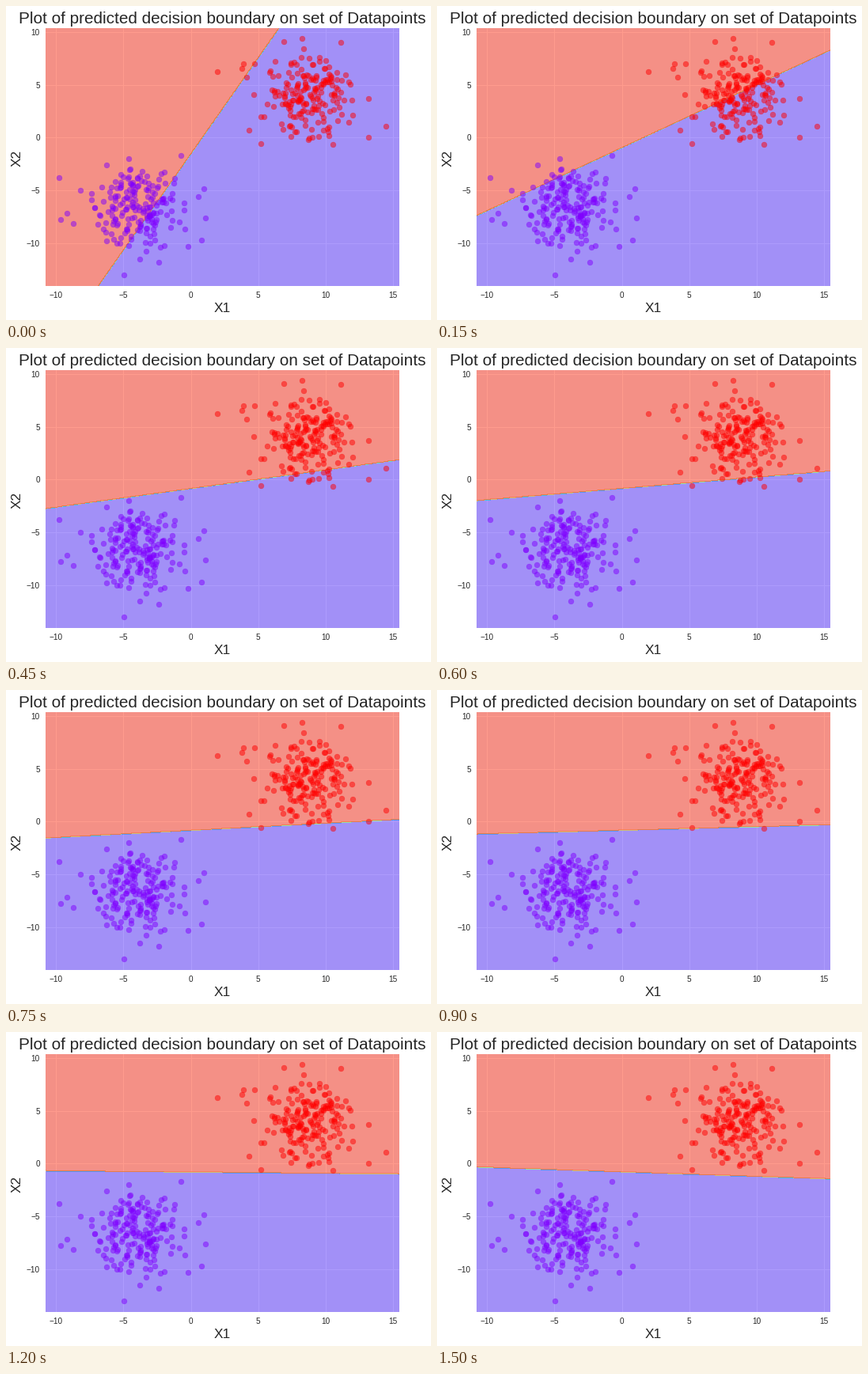
A matplotlib script for the animation above (1650 ms loop, 537 by 397 pixels).

```python
import matplotlib.pyplot as plt
import numpy as np
from matplotlib.animation import FuncAnimation

WIDTH, HEIGHT = 537, 397
LEFT, TOP, AX_W, AX_H = 50, 28, 447, 326.2
XLIM, YLIM = (-10.77, 15.463), (-14.025, 10.345)
MESH = 0.05
STEPS = 11
INK = "0.15"

# The few far-off points that give each cluster its outline.
RED_OUTLIERS = [
    (1.97, 6.2), (3.9, 7.0), (3.8, 6.5), (4.7, 7.0), (4.15, 5.7), (6.9, 9.05),
    (8.25, 9.4), (11.1, 9.0), (8.35, 8.4), (6.25, 7.2), (4.3, 0.7),
    (5.2, -0.55), (10.55, -0.65), (13.15, 0), (14.45, 1.05), (13.2, 3.7),
]
VIOLET_OUTLIERS = [
    (-9.75, -3.8), (-9.65, -7.75), (-9.2, -7.1), (-8.7, -8.1), (-8.2, -5.0),
    (-4.95, -13.0), (-2.35, -11.8), (-3.8, -11.5), (-0.75, -1.65),
    (-4.6, -1.95), (-6.25, -2.6), (0.95, -4.8), (1.1, -7.55), (0.55, -5.6),
    (0.8, -9.65), (-0.2, -10.25),
]

rng = np.random.default_rng(12)


def cluster(center, outliers, spread=2.05, reach=1.95, total=200):
    """Outliers plus a normal cloud cut off at `reach` deviations."""
    cloud = rng.normal(size=(total * 2, 2))
    cloud = cloud[np.hypot(*cloud.T) < reach][:total - len(outliers)]
    return np.vstack([outliers, center + spread * cloud])


def boundary(step):
    """Slope and offset of the decision line after a training step."""
    key_steps = np.array([0, 1, 2, 4, 6, 8, 10])
    key_slopes = [1.817, 0.596, 0.265, 0.107, 0.0336, -0.0115, -0.0427]
    slope = np.interp(np.log1p(step), np.log1p(key_steps), key_slopes)
    offset = -0.87 + 0.009 * step - 0.67 * np.exp(-2 * step)
    return slope, offset


plt.rcParams.update({"font.family": "Liberation Sans", "font.size": 12})
fig = plt.figure(figsize=(WIDTH / 72, HEIGHT / 72), dpi=72, facecolor="white")
ax = fig.add_axes([LEFT / WIDTH, 1 - (TOP + AX_H) / HEIGHT,
                   AX_W / WIDTH, AX_H / HEIGHT], facecolor="#eaeaf2")
ax.set(xlim=XLIM, ylim=YLIM, xticks=range(-10, 16, 5), yticks=range(-10, 11, 5))
ax.set_axisbelow(True)
ax.grid(color="white", linewidth=1)
ax.spines[:].set_visible(False)
ax.tick_params(length=0, pad=7, labelsize=10, labelcolor=INK)
ax.set_title("Plot of predicted decision boundary on set of Datapoints",
             fontsize="xx-large", color=INK, pad=6)


def axis_label(text, x, y, rotation=0):
    fig.text(x / WIDTH, 1 - y / HEIGHT, text, fontsize="x-large", color=INK,
             rotation=rotation, rotation_mode="anchor",
             ha="center", va="baseline")


axis_label("X1", LEFT + AX_W / 2, 387)
axis_label("X2", 19, TOP + AX_H / 2 + 1, rotation=90)

for points, color in [
    (cluster((8.6, 3.8), RED_OUTLIERS), (1, 0, 0)),
    (cluster((-3.8, -6.8), VIOLET_OUTLIERS), (0.5, 0, 1)),
]:
    ax.scatter(*points.T, s=49, color=color, alpha=0.5, linewidth=0.3,
               zorder=1.5)

mesh_x, mesh_y = np.meshgrid(np.arange(XLIM[0], XLIM[1] + MESH, MESH),
                             np.arange(YLIM[0], YLIM[1] + MESH, MESH))
levels = np.arange(8) * 0.15
regions = None


def update(step):
    global regions
    if regions is not None:
        regions.remove()
    slope, offset = boundary(step)
    above = mesh_y > slope * mesh_x + offset
    regions = ax.contourf(mesh_x, mesh_y, above.astype(float), levels=levels,
                          cmap="rainbow", alpha=0.5, zorder=1)
    return [regions]


anim = FuncAnimation(fig, update, frames=STEPS, interval=150, repeat=True)
plt.show()
```
